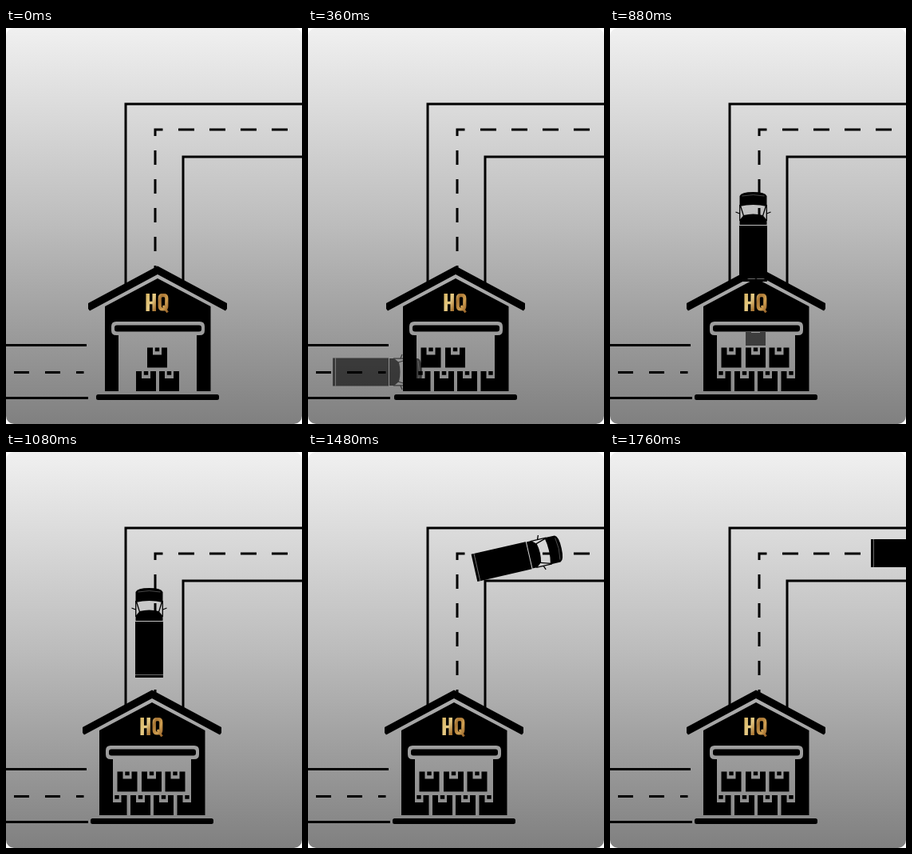
Animation of 371 by 495 pixels, one loop 1840 ms. Source, as an HTML page:

```html
<!DOCTYPE html>
<html lang="en">
<head>
<meta charset="utf-8">
<title>Warehouse delivery</title>
<style>
  html, body { margin: 0; width: 100%; height: 100%; overflow: hidden; background: #fff; }
  svg { display: block; width: 371px; height: 495px; }
  .line { fill: none; stroke: #000; stroke-width: 3; }
  .thin { fill: none; stroke: #000; stroke-width: 1.3; }
</style>
</head>
<body>
<svg viewBox="0 0 371 495">
  <defs>
    <linearGradient id="sky" x2="0" y2="1">
      <stop offset="0" stop-color="#f0f0f0"/>
      <stop offset=".5" stop-color="#bcbcbc"/>
      <stop offset="1" stop-color="#808080"/>
    </linearGradient>
    <linearGradient id="gold" gradientUnits="userSpaceOnUse" x1="168" y1="336" x2="197" y2="350">
      <stop offset="0" stop-color="#d9b765"/>
      <stop offset=".3" stop-color="#e6cb85"/>
      <stop offset=".55" stop-color="#a87432"/>
      <stop offset=".8" stop-color="#d0a052"/>
      <stop offset="1" stop-color="#9a662b"/>
    </linearGradient>
    <clipPath id="door"><path d="M134 380H232V454H134Z"/></clipPath>
    <path id="box" d="M0 0H7V9H18V0H25V25H0ZM9.8 0H15.2V4.8H9.8Z"/>
    <!-- heading right, centred on its own middle -->
    <g id="truck">
      <path d="M-56-17.5H14V17.5H-56Z"/>
      <path d="M15-17H21L27-12Q30 0 27 12L21 17H15Z"/>
      <path d="M38-17H51Q56-15 56 0Q56 15 51 17H38Q42 0 38-17Z"/>
      <path class="thin" d="M20-16.8H40M20 16.8H40M26-12L39-16M26 12L39 16M29-17L31-22M29 17L31 22"/>
      <path d="M-52.5-17.5V17.5" stroke="#999" stroke-width=".7"/>
      <path d="M51-14Q54 0 51 14" fill="none" stroke="#777" stroke-width=".6"/>
    </g>
  </defs>

  <rect width="371" height="495" rx="10" fill="url(#sky)"/>

  <g class="line">
    <path d="M371 95H150V320M371 161H222V320M0 396.5H101M0 462.5H103"/>
    <path d="M187 135V127H196.500"/>
    <path d="M216 127H354" stroke-dasharray="20 19"/>
    <path d="M187 153V302" stroke-dasharray="18 18"/>
    <path d="M10 430.500H97.500" stroke-dasharray="19 20"/>
  </g>

  <use id="arrive" href="#truck"/>
  <use id="leave" href="#truck"/>

  <g id="house">
    <path d="M183 297.500L270 344V351L268 353.500L183 308L98 353.500L96 351V344Z"/>
    <path fill-rule="evenodd" d="M183 313L249.500 348V454H232V384H236Q242 384 242 378V373Q242 367 236 367H131Q125 367 125 373V378Q125 384 131 384H134V454H117V348Z"/>
    <rect x="129" y="371.500" width="109" height="8" rx="3"/>
    <rect x="106" y="458" width="154" height="7" rx="2.500"/>
    <g id="boxes" clip-path="url(#door)" fill-rule="evenodd"></g>
    <g role="img" aria-label="HQ" fill="none" stroke="url(#gold)" stroke-width="4.500">
      <path d="M170.700 332V354M178.700 332V354"/>
      <path d="M170 343.500H179" stroke-width="3.500"/>
      <path d="M189 334.200H191Q194.300 334.200 194.300 338V347.500Q194.300 351.500 191 351.500H189Q185.700 351.500 185.700 347.500V338Q185.700 334.200 189 334.200Z" stroke-width="4.200"/>
      <path d="M190 347L195.500 355.500" stroke-width="3"/>
    </g>
  </g>
</svg>
<script>
const LOOP = 1840, STEP = 40;
const $ = id => document.getElementById(id);
const part = (t, from, to) => Math.min(1, Math.max(0, (t - from) / (to - from)));
const mix = (a, b, k) => a + (b - a) * k;
const easeOut = (k, power) => 1 - (1 - k) ** power;

// x, y, fade-in start, fade-in end
const stack = [
  [156, 429], [185, 429], [170, 399.5],
  [214.500, 429, 80, 160], [126.500, 429, 160, 240],
  [139.500, 399.5, 240, 320], [199.500, 399.5, 460, 600],
  [170, 372, 480, 600]
].map(([x, y, from = -2, to = -1]) => {
  const el = document.createElementNS('http://www.w3.org/2000/svg', 'use');
  el.setAttribute('href', '#box');
  el.setAttribute('x', x);
  el.setAttribute('y', y);
  $('boxes').append(el);
  return { el, from, to };
});
const topBox = stack[stack.length - 1];

function place(el, x, y, angle, opacity) {
  el.setAttribute('transform', `translate(${x} ${y}) rotate(${angle})`);
  el.setAttribute('opacity', opacity);
}

function draw(t) {
  place($('house'), 7 * (1 - part(t, 0, 504)), 0, 0, 1);
  place($('arrive'), -56 + t * 143 / 360, 430, 0, 1 - part(t, 240, 540));

  for (const { el, from, to } of stack) el.setAttribute('opacity', part(t, from, to));
  if (t > 600) topBox.el.setAttribute('opacity', 1 - part(t, 760, 1060));

  // straight up, then round the corner and off to the right
  const turn = part(t, 1320, 1760);
  const y = turn
    ? mix(191, 126.5, easeOut(turn, 5.3))
    : mix(282, 191, part(t, 760, 1280));
  place($('leave'), mix(179.5, 383, easeOut(turn, 1.17)), y,
    -90 * (1 - turn) ** 4.3, part(t, 760, 840));
}

const start = performance.now();
function tick() {
  const t = (performance.now() - start) % LOOP;
  draw(Math.floor(t / STEP) * STEP);
  requestAnimationFrame(tick);
}
tick();
</script>
</body>
</html>
```
